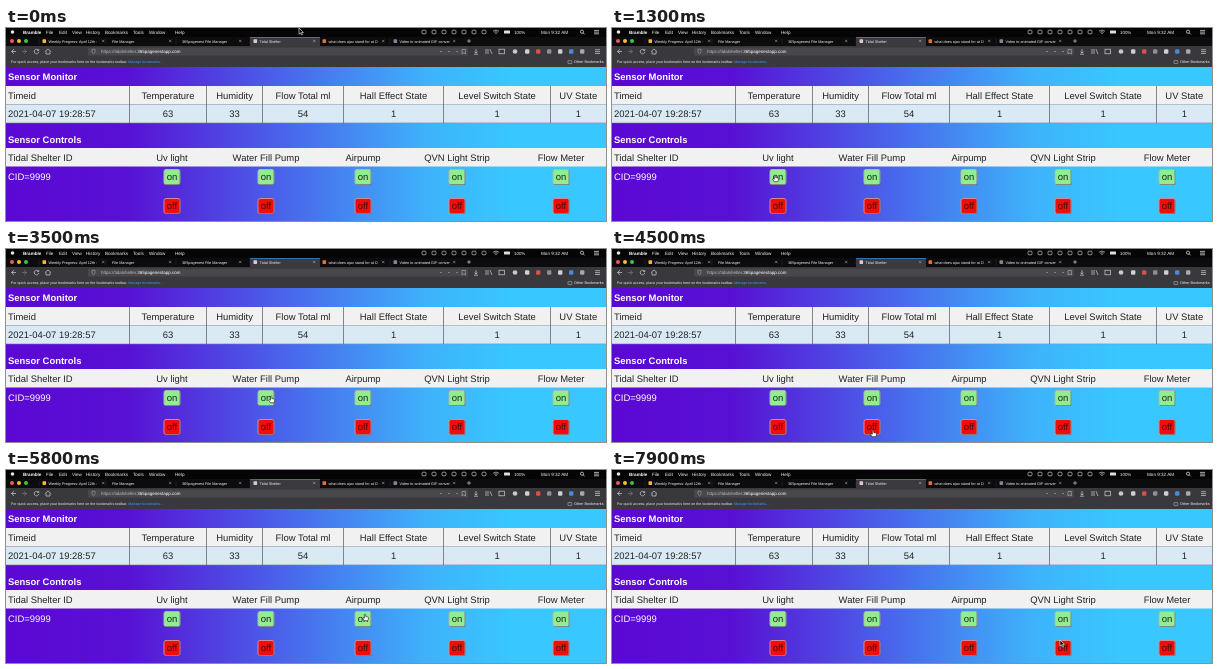
An HTML page for the animation above (8 s loop, 600 by 193 pixels).

```html
<!DOCTYPE html>
<html lang="en">
<head>
<meta charset="utf-8">
<title>Sensor panel</title>
<style>
  html, body { margin: 0; width: 100%; height: 100%; overflow: hidden; background: #000; }
  svg { display: block; width: 100vw; height: 100vh; }
  text {
    font-family: "Liberation Sans", Arial, sans-serif;
    text-rendering: geometricPrecision;
    white-space: pre;
  }
</style>
</head>
<body>
<svg id="stage" viewBox="0 0 600 193" xmlns="http://www.w3.org/2000/svg">
  <defs>
    <linearGradient id="page">
      <stop offset="0" stop-color="#5c08d4"/>
      <stop offset=".2" stop-color="#5810d4"/>
      <stop offset=".45" stop-color="#4a60ea"/>
      <stop offset=".7" stop-color="#3eb2fb"/>
      <stop offset=".85" stop-color="#38c8ff"/>
      <stop offset="1" stop-color="#38c8ff"/>
    </linearGradient>
  </defs>
  <g id="browser"></g>
  <g id="content"></g>
  <g id="cursor" stroke-linejoin="round">
    <path id="arrow" d="M0 0V6.2L1.5 4.9L2.5 7L3.5 6.5L2.5 4.5H4.4Z" fill="#000" stroke="#fff" stroke-width=".6"/>
    <path id="hand" d="M-.7 .4Q0 -.5 .7 .4V2.6L3.1 3.1Q3.7 3.4 3.5 4.3L2.9 6.7H-.8L-2.5 4.2Q-2.3 3.2 -.7 4.2Z" fill="#fff" stroke="#111" stroke-width=".6"/>
  </g>
</svg>
<script>
const LOOP = 8000, STEP = 100;
const $ = id => document.getElementById(id);
const browser = $("browser"), content = $("content");

function add(parent, tag, attrs, text) {
  const node = document.createElementNS("http://www.w3.org/2000/svg", tag);
  for (const key in attrs) node.setAttribute(key, attrs[key]);
  if (text !== undefined) node.textContent = text;
  parent.append(node);
  return node;
}
const box = (parent, x, y, width, height, fill, more) =>
  add(parent, "rect", { x, y, width, height, fill, ...more });
const label = (parent, x, y, text, size, fill, more) =>
  add(parent, "text", { x, y, "font-size": size, fill, ...more }, text);
const dot = (x, y, r, fill) => add(browser, "circle", { cx: x, cy: y, r, fill });
const stroke = (d, color = "#d0d0d3", width = .7) =>
  add(browser, "path", { d, fill: "none", stroke: color, "stroke-width": width });
const bold = { "font-weight": "bold" };
const middle = { "text-anchor": "middle" };

function drawMenuBar() {
  box(browser, 0, 0, 600, 9, "#050506");
  dot(6.5, 4, 1.8, "#e4e4e4");
  const menus = [["File", 40], ["Edit", 53], ["View", 66], ["History", 80],
    ["Bookmarks", 99], ["Tools", 127], ["Window", 143], ["Help", 169]];
  label(browser, 17, 5.7, "Bramble", 4.6, "#fff", bold);
  for (const [name, x] of menus) label(browser, x, 5.7, name, 4.6, "#f4f4f4");
  for (let x = 416; x <= 476; x += 10) {
    box(browser, x, 2.2, 4, 3.6, "none", { rx: 1, stroke: "#c9c9c9", "stroke-width": .7 });
  }
  stroke("M487 3.2Q490 .9 493 3.2M488.3 4.4Q490 3 491.7 4.4");
  dot(490, 5.5, .6, "#ddd");
  box(browser, 498, 2.4, 6, 3.2, "#ddd", { rx: .6 });
  label(browser, 508, 5.7, "100%", 4.4, "#f4f4f4");
  label(browser, 535, 5.7, "Mon 9:32 AM", 4.6, "#f4f4f4");
  add(browser, "circle", { cx: 576, cy: 3.7, r: 1.6, fill: "none", stroke: "#eee", "stroke-width": .7 });
  stroke("M577.2 4.9L578.6 6.3M588 2.4h5M588 4.1h5M588 5.8h5", "#eee");
}

function drawTabs() {
  box(browser, 0, 9, 600, 9, "#0c0c0e");
  ["#f25a52", "#f4bd34", "#3ec446"].forEach((color, i) => dot(6 + i * 7, 13, 2, color));
  box(browser, 244, 9, 70, 9, "#3a3a3f");
  box(browser, 244, 9, 70, .7, "#2f8ee8");
  const tabs = [
    [34, "#f3bb2e", "Weekly Progress: April 12th -"],
    [101, null, "File Manager"],
    [171, null, "365pagenest File Manager"],
    [245, "#e0c5d4", "Tidal Shelter"],
    [314, "#e4703c", "what does ajax stand for at D"],
    [385, "#7c8797", "Video to animated GIF conver"]
  ];
  for (const [x, icon, name] of tabs) {
    if (icon) box(browser, x + 2.5, 11.3, 3.6, 3.6, icon, { rx: .7 });
    label(browser, x + (icon ? 8.5 : 5), 14.5, name, 3.8, "#f2f2f4");
    stroke(`M${x + 62} 11.8l2.4 2.4m0 -2.4l-2.4 2.4`, "#b9b9bc", .5);
    stroke(`M${x - 1} 10.5v6`, "#3a3a3d", .4);
  }
  stroke("M461 13h4M463 11v4", "#ddd", .6);
}

function drawToolbars() {
  box(browser, 0, 18, 600, 21, "#38383d");
  stroke("M8 21.2L5.5 23.5L8 25.8M5.5 23.5H10");
  stroke("M18 21.2L20.5 23.5L18 25.8M16 23.5H20.5", "#7a7a7e");
  stroke("M32.4 22.2A2.3 2.3 0 1 0 32.8 24M32.8 21V22.6H31");
  stroke("M39 23.6L42 21L45 23.6M40 23.2V26H44V23.2");
  box(browser, 82, 19.5, 380, 8, "#47474c", { rx: 1 });
  stroke("M86 21.3H89V23.6Q89 25 87.5 25.8Q86 25 86 23.6Z", "#bbb", .5);
  const address = label(browser, 95, 25, "", 4.5, "#bcbcc0");
  add(address, "tspan", {}, "https://tidalshelter.");
  add(address, "tspan", { fill: "#fff" }, "365pagenestapp.com");
  for (const x of [435, 443, 451]) dot(x, 23.5, .6, "#ccc");
  stroke("M456 21.5V26L457.7 24.8L459.4 26V21.5Z", "#ccc", .5);
  stroke("M470 21V25M468.5 23.6L470 25.2L471.5 23.6M468 26.2H472");
  stroke("M480 21V26M482 21V26M484 21.2L486 26");
  box(browser, 493, 21.2, 5.4, 4.6, "none", { stroke: "#d0d0d3", "stroke-width": .7 });
  dot(509, 23.5, 2.3, "#c9c9cd");
  const addons = ["#d0d0d3", "#d7504a", "#8b8f9a", "#d0d0d3", "#4c87d8", "#a8a8ae"];
  addons.forEach((color, i) => box(browser, 519 + i * 11, 21.3, 4.4, 4.4, color, { rx: 1.2 }));
  stroke("M589 21.7H594M589 23.6H594M589 25.5H594");
  const hint = label(browser, 5, 35.3, "", 3.65, "#f2f2f4");
  add(hint, "tspan", {}, "For quick access, place your bookmarks here on the bookmarks toolbar. ");
  add(hint, "tspan", { fill: "#3d9bff" }, "Manage bookmarks...");
  box(browser, 562, 32.6, 3.8, 3, "none", { rx: .4, stroke: "#ccc", "stroke-width": .5 });
  label(browser, 568, 35.3, "Other Bookmarks", 3.8, "#f2f2f4");
}

const controls = [["Uv light", 166], ["Water Fill Pump", 260], ["Airpump", 357],
  ["QVN Light Strip", 451], ["Flow Meter", 555]];

function drawButton(x, y, name, fill, edge, ink) {
  box(content, x - 8, y - 7.5, 16, 15, fill, { rx: 2, stroke: edge, "stroke-width": 1 });
  add(content, "path", {
    d: `M${x - 7} ${y + 7.5}H${x + 8}V${y - 6.5}`,
    fill: "none", stroke: "#555", "stroke-opacity": .6, "stroke-width": .8
  });
  label(content, x, y + 3.2, name, 9.5, ink, middle);
}

function drawPage() {
  const size = 9.45, ink = "#222";
  box(content, 0, 39, 600, 154, "url(#page)");
  label(content, 2, 51.5, "Sensor Monitor", size, "#fff", bold);
  box(content, 0, 58, 600, 18.5, "#f1f1f1");
  box(content, 0, 76.5, 600, 18.5, "#d9eaf5");
  box(content, 0, 76.2, 600, .6, "#a9b3ba");
  box(content, 0, 94.6, 600, .6, "#8292ac");
  label(content, 2, 70.5, "Timeid", size, ink);
  label(content, 2, 89.3, "2021-04-07 19:28:57", size, ink);
  const readings = [["Temperature", 63], ["Humidity", 33], ["Flow Total ml", 54],
    ["Hall Effect State", 1], ["Level Switch State", 1], ["UV State", 1]];
  const edges = [123.5, 200.5, 256.5, 337.5, 437.5, 544.5, 600];
  readings.forEach(([name, value], i) => {
    const x = (edges[i] + edges[i + 1]) / 2;
    box(content, edges[i] - .4, 58, .8, 37, "#666b70");
    label(content, x, 70.5, name, size, ink, middle);
    label(content, x, 89.3, value, size, ink, middle);
  });

  label(content, 2, 114.5, "Sensor Controls", size, "#fff", bold);
  box(content, 0, 120, 600, 18.5, "#f1f1f1");
  label(content, 2, 133, "Tidal Shelter ID", size, ink);
  label(content, 2, 152.3, "CID=9999", size, "#fff");
  for (const [name, x] of controls) {
    label(content, x, 133, name, size, ink, middle);
    drawButton(x, 149, "on", "#90ee90", "#a9b8ac", "#1c241c");
    drawButton(x, 178, "off", "#f20d0d", "#d58a92", "#4a0808");
  }
}

// Pointer path: time, x, y
const path = [
  [0, 293, 0], [200, 293, 0], [1100, 163, 147], [1500, 163, 147],
  [2000, 164, 182], [2500, 164, 182], [3200, 266, 147], [3600, 265, 147],
  [4200, 261, 181], [4700, 261, 181], [5500, 359, 144], [5900, 359, 144],
  [6300, 357, 183], [6700, 357, 182], [7400, 450, 146], [7600, 450, 147],
  [7900, 448, 170], [8000, 448, 176]
];

function pointerAt(time) {
  const next = path.findIndex(point => point[0] > time);
  const [t0, x0, y0] = path[next - 1], [t1, x1, y1] = path[next];
  const k = (time - t0) / (t1 - t0), eased = k * k * (3 - 2 * k);
  return [x0 + (x1 - x0) * eased, y0 + (y1 - y0) * eased];
}

function render(time) {
  const [x, y] = pointerAt(Math.floor(time % LOOP / STEP) * STEP);
  const overButton = controls.some(([, cx]) => Math.abs(x - cx) < 8) &&
    (Math.abs(y - 149) < 7.5 || Math.abs(y - 178) < 7.5);
  $("cursor").setAttribute("transform", `translate(${x} ${y})`);
  $("hand").style.display = overButton ? "" : "none";
  $("arrow").style.display = overButton ? "none" : "";
}

drawMenuBar();
drawTabs();
drawToolbars();
drawPage();

const start = performance.now();
function tick() {
  render(performance.now() - start);
  requestAnimationFrame(tick);
}
tick();
</script>
</body>
</html>
```
